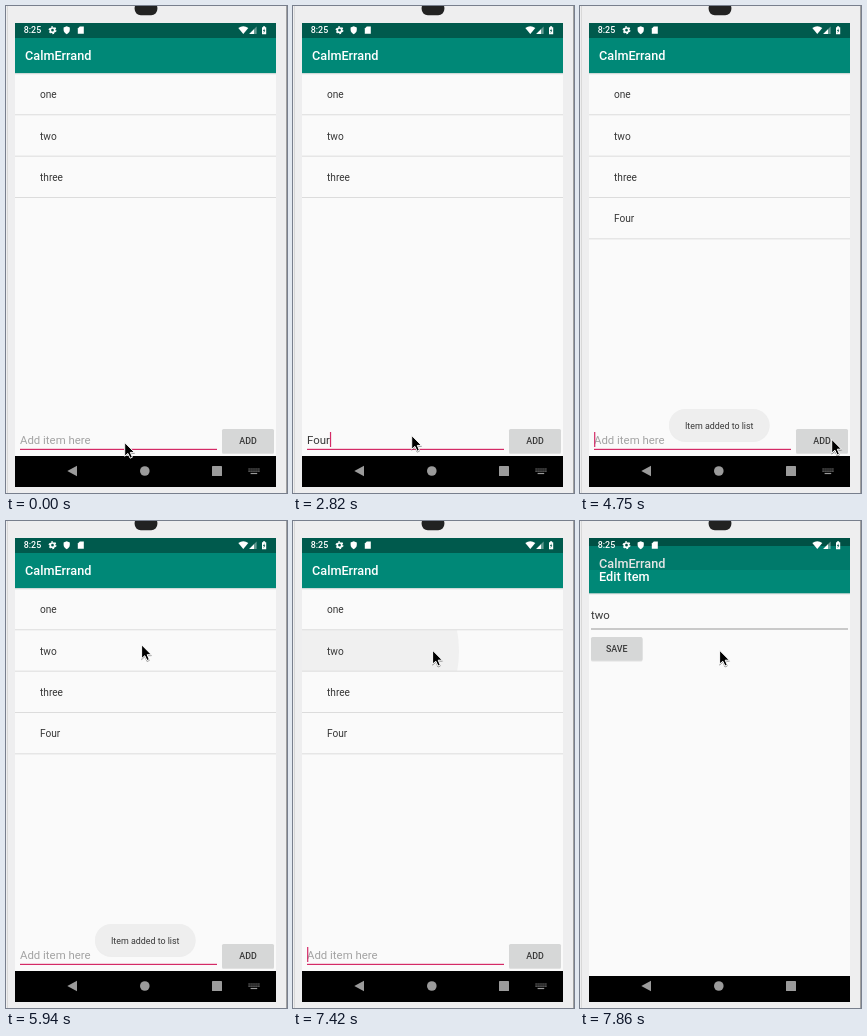
Write an HTML page that moves like this. It is 281 px wide and 487 px high and loops after 8 s.

```html
<!DOCTYPE html>
<html lang="en">
<head>
<meta charset="utf-8">
<title>Todo list demo</title>
<style>
  html, body { margin: 0; width: 100%; height: 100%; overflow: hidden; background: #eeeeef; }
  svg { display: block; width: 100%; height: 100%; }
  text { font-family: Roboto, "Open Sans", sans-serif; fill: #383838; white-space: pre; }
  .title { font-size: 12.7px; font-weight: 500; fill: #fff; }
  .item { font-size: 10.15px; }
  .field { font-size: 11.4px; }
  .label { font-size: 8.9px; font-weight: 500; }
  .toast { font-size: 8.9px; }
  .rule { fill: #dcdcdc; }
  .accent { fill: #d42a66; }
</style>
</head>
<body>
<svg viewBox="0 0 281 487" preserveAspectRatio="none">
  <defs>
    <linearGradient id="shade" x1="0" y1="0" x2="0" y2="1">
      <stop offset="0" stop-color="#000" stop-opacity=".12"/>
      <stop offset="1" stop-color="#000" stop-opacity="0"/>
    </linearGradient>
    <clipPath id="screen"><rect x="9" y="17" width="261" height="464"/></clipPath>
    <clipPath id="row"><rect x="9" y="109" width="261" height="41"/></clipPath>
    <clipPath id="reveal"><rect x="9" y="49" width="261" height="406"/></clipPath>
  </defs>

  <!-- phone body -->
  <rect width="281" height="487" fill="#eeeeef"/>
  <rect x="1" width="1" height="487" fill="#d8d8d8"/>
  <rect x="280" width="1" height="487" fill="#a0a0a0"/>
  <rect x="128.6" y="-4" width="22.8" height="13.2" rx="6.2" fill="#222"/>

  <g clip-path="url(#screen)">
    <rect x="9" y="17" width="261" height="464"/>
    <rect x="9" y="17" width="261" height="15.5" fill="#005a4d"/>

    <g id="listPage">
      <rect x="9" y="32" width="261" height="419" fill="#fafafa"/>
      <rect x="9" y="32" width="261" height="35.1" fill="#008877"/>
      <rect x="9" y="67.1" width="261" height="2" fill="url(#shade)"/>
      <text class="title" x="19" y="54.4">CalmErrand</text>
      <g clip-path="url(#row)"><circle id="ripple" cy="130"/></g>
      <g id="items"></g>
      <text class="field" id="entry" x="14" y="438"></text>
      <rect class="accent" x="14" y="442.8" width="197" height="1.2"/>
      <rect class="accent" id="caret" y="426" width="1.2" height="15"/>
      <rect x="216" y="424" width="52" height="24" rx="1.5" fill="#000" opacity=".1"/>
      <rect id="add" x="216" y="423" width="52" height="24" rx="1.5"/>
      <text class="label" x="242" y="438.2" text-anchor="middle">ADD</text>
      <rect id="dim" x="9" y="17" width="261" height="434"/>
    </g>

    <g id="editPage" clip-path="url(#reveal)">
      <rect x="9" y="72" width="261" height="383" fill="#fafafa"/>
      <rect x="9" y="37" width="261" height="35.3" fill="#008877"/>
      <rect x="9" y="72.3" width="261" height="2" fill="url(#shade)"/>
      <text class="title" x="19" y="59.7">Edit Item</text>
      <text class="field" x="11" y="98">two</text>
      <rect x="11" y="107.5" width="257" height="1" fill="#9a9a9a"/>
      <rect x="11" y="117" width="51.5" height="23.5" rx="1.5" fill="#000" opacity=".1"/>
      <rect x="11" y="116" width="51.5" height="23.5" rx="1.5" fill="#d6d7d7"/>
      <text class="label" x="36.8" y="131.2" text-anchor="middle">SAVE</text>
    </g>

    <!-- status bar -->
    <g fill="#fff">
      <text class="label" x="17.7" y="27.4" style="fill:#fff">8:25</text>
      <circle cx="46.5" cy="24.2" r="2.2" fill="none" stroke="#fff" stroke-width="1.7"/>
      <circle cx="46.5" cy="24.2" r="3.3" fill="none" stroke="#fff" stroke-width="1.3" stroke-dasharray="1.73"/>
      <path d="M60.7 20.2l3.1 1.3v2.3q0 3-3.1 4.4q-3.1-1.4-3.1-4.4v-2.3z"/>
      <path d="M73.8 20.6h4v7.2h-6v-5.2z"/>
      <path d="M232.3 22q5-3.6 10 0l-5 6z"/>
      <path d="M250.6 20.6v7.4h-7.4z" opacity=".4"/>
      <path d="M248 23.2v4.8h-4.8z"/>
      <path d="M256 21.2h1.1v-.9h2v.9h1.1v7h-4.2z"/>
      <path d="M258.6 22.2l-1.7 2.9h1l-.3 2.1l1.7-2.9h-1z" fill="#005a4d"/>
    </g>

    <!-- navigation bar -->
    <rect id="nav" x="9" width="261" height="40"/>
    <g fill="#9b9b9b">
      <path d="M61.3 465l9.7-5.2v10.4z"/>
      <circle cx="138.8" cy="465" r="4.8"/>
      <rect x="206" y="460" width="10" height="10" rx=".6"/>
      <g id="keys" fill="none" stroke="#9b9b9b" stroke-width="1.2">
        <path d="M242.5 463h11M242.5 465.2h11" stroke-dasharray="1.2 .76"/>
        <path d="M244.6 467.5h6.6"/>
      </g>
    </g>

    <g id="toast">
      <rect x="89" y="404" width="100.5" height="32" rx="16" fill="#000" opacity=".05"/>
      <rect x="89" y="403" width="100.5" height="32" rx="16" fill="#eee"/>
      <text class="toast" x="139.2" y="422.8" text-anchor="middle">Item added to list</text>
    </g>
  </g>

  <path id="pointer" d="M0 0V13.8L3.2 10.9L5.4 15.7L7.7 14.7L5.6 9.9H9.8Z" stroke="#fff" stroke-width="1"
    style="filter:drop-shadow(.4px 1px .6px rgba(0,0,0,.35))"/>
</svg>

<script>
const LOOP = 8000;
const $ = id => document.getElementById(id);

// Each track lists [start, value]; a value holds until the next start.
const tracks = {
  pointer: [[0, [118.7, 436.5]], [140, [118.7, 433]], [290, [118.7, 429.5]], [3420, [190, 435]],
    [3570, [259, 441]], [3860, [254, 436]], [4010, [251.7, 433.3]], [5190, [212, 290]],
    [5340, [150, 150]], [5490, [138, 113]], [5940, [135.6, 123.8]], [6090, [139.6, 129.3]]],
  typed: [[0, ""], [880, "F"], [2070, "Fo"], [2370, "Fou"], [2820, "Four"], [4300, ""]],
  caret: [[0, 0], [290, 1], [730, 0], [880, 1], [1330, 0], [1930, 1], [3420, 0], [3860, 1],
    [4890, 0], [5490, 1], [5940, 0], [6380, 1], [6970, 0], [7420, 1]],
  add: [[0, "#d6d7d7"], [4150, "#c4c5c5"], [4450, "#cdcece"], [4600, "#d6d7d7"]],
  toast: [[0, 0], [4450, .3], [4600, .7], [4740, 1], [6530, .75], [6680, .5], [6820, .25], [6970, 0]],
  ripple: [[0, [0, 0, "#f0f0f0"]], [7420, [56, 110, "#f0f0f0"]], [7560, [139, 220, "#e9e9e9"]]],
  dim: [[0, 0], [7710, .04], [7860, .1]],
  lift: [[0, 0], [7710, .6], [7860, 7]],
  page: [[0, "list"], [7860, "edit"]]
};

const valueAt = (name, t) => tracks[name].filter(([start]) => start <= t).pop()[1];
const show = (el, on) => el.setAttribute("display", on ? "inline" : "none");
const set = (el, attrs) => {
  for (const key in attrs) el.setAttribute(key, attrs[key]);
};

const rows = ["one", "two", "three", "Four"].map((label, i) => {
  const y = 67.2 + 41.35 * i;
  const row = document.createElementNS("http://www.w3.org/2000/svg", "g");
  row.innerHTML = `<text class="item" x="34" y="${y + 25}">${label}</text>
    <rect class="rule" x="9" y="${y + 41.1}" width="261" height="1"/>`;
  $("items").append(row);
  return row;
});

function draw(t) {
  const typed = valueAt("typed", t);
  const entry = $("entry");
  entry.textContent = typed || "Add item here";
  entry.style.fill = typed ? "#383838" : "#a3a3a3";
  const end = typed ? entry.getComputedTextLength() : 0;
  set($("caret"), { x: 14.1 + end });
  show($("caret"), valueAt("caret", t));

  show(rows[3], t >= 4300);
  set($("add"), { fill: valueAt("add", t) });
  set($("toast"), { opacity: valueAt("toast", t) });

  const [cx, r, fill] = valueAt("ripple", t);
  set($("ripple"), { cx, r, fill });

  const editing = valueAt("page", t) === "edit";
  set($("listPage"), { transform: `translate(0 ${-valueAt("lift", t)})` });
  set($("dim"), { opacity: valueAt("dim", t) });
  show($("editPage"), editing);
  set($("nav"), { y: editing ? 455 : 450 });
  show($("keys"), t < 7710);

  set($("pointer"), { transform: `translate(${valueAt("pointer", t)})` });
}

function tick() {
  draw(performance.now() % LOOP);
  requestAnimationFrame(tick);
}
tick();
</script>
</body>
</html>
```
